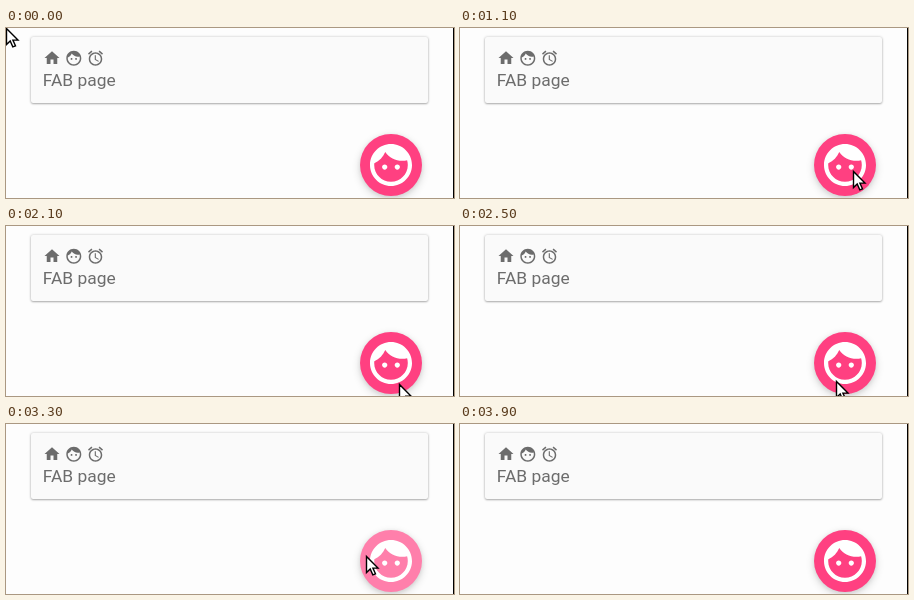
Recreate the animation shown at these times as an HTML page. Size 448 by 170 pixels, loop 4.3 s.

```html
<!DOCTYPE html>
<html lang="en">
<head>
<meta charset="utf-8">
<title>FAB page</title>
<style>
  html, body { margin: 0; width: 448px; height: 170px; overflow: hidden; background: #fdfdfd; }
  body { position: relative; }
  .card, .fab, .edge, svg { position: absolute; }
  .card {
    left: 25px; top: 9px; width: 397px; height: 66px; border-radius: 2px; background: #fafafa;
    box-shadow: 0 1px 2px rgba(0,0,0,.26), 0 0 3px rgba(0,0,0,.2);
  }
  .fab {
    left: 354px; top: 106px; width: 62px; height: 62px; border-radius: 50%;
    box-shadow: 0 3px 8px rgba(0,0,0,.16), 0 1px 4px rgba(0,0,0,.08);
  }
  .edge { left: 447px; top: 0; width: 1px; height: 170px; background: #000; }
  svg { left: 0; top: 0; }
  text { font: 17.4px Roboto, Arial, sans-serif; }
</style>
</head>
<body>
<div class="card"></div>
<div class="fab" id="fab"></div>
<div class="edge"></div>
<svg width="448" height="170" viewBox="0 0 448 170">
  <defs>
    <path id="home" d="M10 20v-6h4v6h5v-8h3L12 3 2 12h3v8z"/>
    <path id="face" d="M9 11.75c-.69 0-1.25.56-1.25 1.25s.56 1.25 1.25 1.25 1.25-.56 1.25-1.25-.56-1.25-1.25-1.25zm6 0c-.69 0-1.25.56-1.25 1.25s.56 1.25 1.25 1.25 1.25-.56 1.25-1.25-.56-1.25-1.25-1.25zM12 2C6.48 2 2 6.48 2 12s4.48 10 10 10 10-4.48 10-10S17.52 2 12 2zm0 18c-4.41 0-8-3.59-8-8 0-.29.02-.58.05-.86 2.36-1.05 4.23-2.98 5.21-5.37C11.07 8.33 14.05 10 17.42 10c.78 0 1.53-.09 2.25-.26.21.71.33 1.47.33 2.26 0 4.41-3.59 8-8 8z"/>
    <path id="alarm" d="M22 5.72l-4.6-3.86-1.29 1.53 4.6 3.86L22 5.72zM7.88 3.39L6.6 1.86 2 5.71l1.29 1.53 4.59-3.85zM12.5 8H11v6l4.75 2.85.75-1.23-4-2.37V8zM12 4c-4.97 0-9 4.03-9 9s4.02 9 9 9c4.97 0 9-4.03 9-9s-4.03-9-9-9zm0 16c-3.87 0-7-3.13-7-7s3.13-7 7-7 7 3.13 7 7-3.13 7-7 7z"/>
  </defs>
  <g fill="#6c6c6c">
    <use href="#home" transform="translate(37 21) scale(.75)"/>
    <use href="#face" transform="translate(58.8 21.2) scale(.75)"/>
    <use href="#alarm" transform="translate(80.5 21.2) scale(.75)"/>
    <text x="36.8" y="58.3">FAB page</text>
  </g>
  <use href="#face" fill="#fff" transform="translate(359.8 111.8) scale(2.1)"/>
  <path id="cursor" d="M.5 .5v16l3.7-3.5 2.6 5.9 2.7-1.1-2.6-5.7h5.1z" fill="#fff" stroke="#000" stroke-width="1.4"/>
</svg>
<script>
const LOOP = 4300, STEP = 100;

const rest = [396, 145], end = [360, 132];

// pointer strokes as cubic curves; repeated points give a slow start
const strokes = [
  { from: 200, to: 500, curve: [[0, 0], [0, 0], [0, 0], [600, 196]] },
  { from: 800, to: 1200, curve: [[470, 172], [407, 149], [383, 138], rest] },
  { from: 1900, to: 3100, curve: [rest, [397, 185], [354, 135], end] },
  { from: 3700, to: 3900, curve: [end, end, end, [345, 190]] }
];
const clicks = [1400, 3200];

const fab = document.getElementById("fab");
const cursor = document.getElementById("cursor");

const clamp = v => Math.min(1, Math.max(0, v));

function bezier([a, b, c, d], u) {
  const v = 1 - u;
  return [0, 1].map(i => v ** 3 * a[i] + 3 * u * v * (v * b[i] + u * c[i]) + u ** 3 * d[i]);
}

function pointer(t) {
  const { from, to, curve } = strokes.findLast(s => s.from <= t) ?? strokes[0];
  return bezier(curve, clamp((t - from) / (to - from))).map(Math.round);
}

// share of white in the button: quick rise, slower fall
const flash = age => .33 * clamp(Math.min((age + 100) / 200, (500 - age) / 270));

function draw(now) {
  const t = Math.floor(now % LOOP / STEP) * STEP;
  const k = Math.max(...clicks.map(c => flash(t - c)));
  cursor.setAttribute("transform", `translate(${pointer(t)})`);
  fab.style.background = `rgb(255 ${64 + 191 * k} ${129 + 126 * k})`;
}

let start;
function tick(now) {
  start ??= now;
  draw(now - start);
  requestAnimationFrame(tick);
}
draw(0);
requestAnimationFrame(tick);
</script>
</body>
</html>
```
